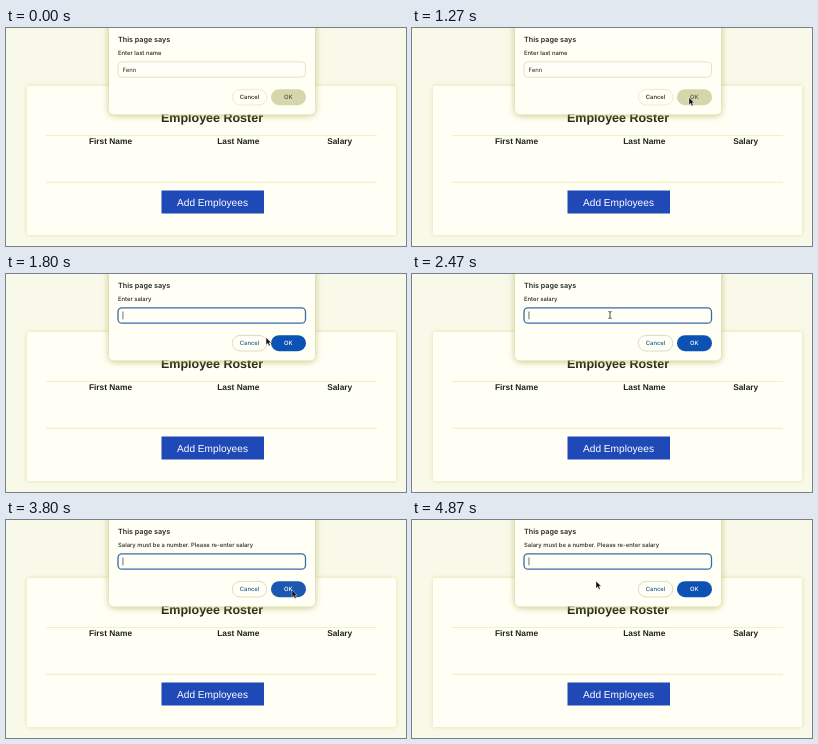
Animation of 400 by 218 pixels, one loop 4.99 s. Source, as an HTML page:

```html
<!DOCTYPE html>
<html lang="en">
<head>
<meta charset="utf-8">
<title>Employee Payroll Tracker</title>
<style>
  html, body { margin: 0; width: 100%; height: 100%; overflow: hidden; background: #f9f9e9; }
  svg { display: block; width: 100%; height: 100%; text-rendering: geometricPrecision; }
  .page { font-family: "Liberation Sans", Arial, sans-serif; fill: #20261a; text-anchor: middle; }
  .bold { font-weight: 700; }
  .col { font-size: 8.35px; font-weight: 700; }
  .ui { font-family: Inter, Roboto, sans-serif; font-size: 5.9px; fill: #26281f; }
  .button { text-anchor: middle; font-weight: 500; }
  .card { filter: drop-shadow(0 0 2px #cfcf6a88); }
  #dialog { filter: drop-shadow(0 1px 3.5px #a8a84cb0); }
  #input { fill: #fffff8; stroke: #dcdcb8; stroke-width: .8; }
  #cancelBox { fill: #fffff6; stroke: #e6e6c4; stroke-width: .8; }
  #okBox { fill: #d6d6ab; }
  #okText { fill: #55564a; }
  .focused #input { stroke: #3a6ca6; stroke-width: 1.3; }
  .focused #cancelBox { stroke: #cfd5b8; }
  .focused #cancelText { fill: #245a90; }
  .focused #okBox { fill: #0c52b4; }
  .focused.hover #okBox { fill: #1c57b2; }
  .focused #okText { fill: #fff; }
</style>
</head>
<body>
<svg viewBox="0 0 400 218" preserveAspectRatio="none">
  <g class="page">
    <text class="bold" x="206" y="35" font-size="14.7">Employee Payroll Tracker</text>
    <rect class="card" x="21" y="58" width="369" height="149" rx="2" fill="#fffff5"/>
    <text class="bold" x="206" y="94.3" font-size="12.5">Employee Roster</text>
    <path d="M40 107.5H371" stroke="#f1f1c0"/>
    <path d="M40 154.3H371" stroke="#ebebaa" stroke-width=".8"/>
    <text class="col" x="104.5" y="116">First Name</text>
    <text class="col" x="232.3" y="116">Last Name</text>
    <text class="col" x="333.7" y="116">Salary</text>
    <rect x="155.5" y="162.5" width="102.5" height="23" fill="#1f49b6"/>
    <text x="206.5" y="177.5" font-size="10.15" fill="#fff">Add Employees</text>
  </g>

  <g id="dialog" class="ui">
    <rect x="103" y="-12" width="206" height="98.5" rx="5" fill="#fffff6"/>
    <text x="112" y="13.6" font-size="7.2" font-weight="600">This page says</text>
    <text id="label" x="112" y="27" font-weight="500"></text>
    <rect id="input" x="112" y="33.8" width="187.5" height="15.4" rx="4"/>
    <text id="value" x="116.5" y="43.5"></text>
    <rect id="caret" y="37.5" width=".7" height="7.8" fill="#333"/>
    <rect id="cancelBox" x="226.3" y="61.4" width="34.5" height="15.6" rx="7.8"/>
    <text id="cancelText" class="button" x="243.5" y="71.4">Cancel</text>
    <rect id="okBox" x="265" y="61.2" width="35" height="16" rx="8"/>
    <text id="okText" class="button" x="282.3" y="71.4">OK</text>
  </g>

  <path id="arrow" d="M0 0V7.4L1.7 5.8L2.9 8.5L4.2 7.9L3 5.3H5.2Z" fill="#111" stroke="#fff" stroke-width=".4"/>
  <path id="beam" d="M-1.6-3.5Q0-3.5 0-2.4Q0-3.5 1.6-3.5M0-2.4V2.4M-1.6 3.5Q0 3.5 0 2.4Q0 3.5 1.6 3.5" fill="none" stroke="#222" stroke-width=".8"/>
</svg>
<script>
const LOOP = 4990, TICK = 1000 / 15;
const el = id => document.getElementById(id);
const [dialog, label, value, caret, arrow, beam] =
  ["dialog", "label", "value", "caret", "arrow", "beam"].map(el);

const prompts = [
  { from: 0, text: "Enter last name" },
  { from: 1395, text: "Enter salary" },
  { from: 3728, text: "Salary must be a number. Please re-enter salary" }
];
const keys = [[2665, "g"], [2865, "f"], [2930, "g"], [2995, "g"]];

// Pointer path: time, x, y
const path = [
  [70, 236, 222], [930, 262, 61], [1130, 277, 69.5], [1600, 277, 69.5],
  [2270, 198, 41], [3000, 198, 41], [3530, 286, 69.5], [3870, 286, 70],
  [4330, 190, 65], [4400, 190, 65], [4530, 184, 61]
];

function pointer(t) {
  const i = path.findIndex(p => p[0] > t);
  if (i < 0) return path[path.length - 1].slice(1);
  if (i === 0) return path[0].slice(1);
  const [t0, x0, y0] = path[i - 1], [t1, x1, y1] = path[i];
  const u = (t - t0) / (t1 - t0), k = u * u * (3 - 2 * u);
  return [x0 + (x1 - x0) * k, y0 + (y1 - y0) * k];
}

function draw(t) {
  const stage = prompts.filter(p => p.from <= t).length - 1;
  const { from, text } = prompts[stage];
  const pressed = stage === 1 ? keys.filter(k => k[0] <= t) : [];
  const typed = pressed.map(k => k[1]).join("");
  const opening = stage > 0 && t - from < TICK - 5;
  const [x, y] = pointer(t);
  const overField = x > 112 && x < 300 && y > 34 && y < 49;
  const overOk = x > 265 && x < 300 && y > 61 && y < 77;

  label.textContent = text;
  value.textContent = stage ? typed : "Fenn";
  dialog.setAttribute("class", `ui${stage ? " focused" : ""}${overOk ? " hover" : ""}`);
  dialog.setAttribute("opacity", opening ? .88 : 1);
  dialog.setAttribute("transform", `translate(0 ${opening ? -1.4 : 0})`);

  // The caret blinks, starting over with each prompt and key press
  const blinkStart = pressed.length ? pressed[pressed.length - 1][0] : from;
  const blinkOn = Math.floor((t - blinkStart) / 534) % 2 === 0;
  caret.style.display = stage && blinkOn ? "" : "none";
  caret.setAttribute("x", 116.6 + (typed ? value.getComputedTextLength() + .3 : 0));

  const hidden = t < 65 || (t >= 2665 && t < 3060);
  arrow.style.display = hidden || overField ? "none" : "";
  beam.style.display = !hidden && overField ? "" : "none";
  for (const p of [arrow, beam]) p.setAttribute("transform", `translate(${x} ${y})`);
}

const start = performance.now();
function frame() {
  const t = (performance.now() - start) % LOOP;
  draw(Math.floor((t + 4) / TICK) * TICK);
  requestAnimationFrame(frame);
}
frame();
</script>
</body>
</html>
```
